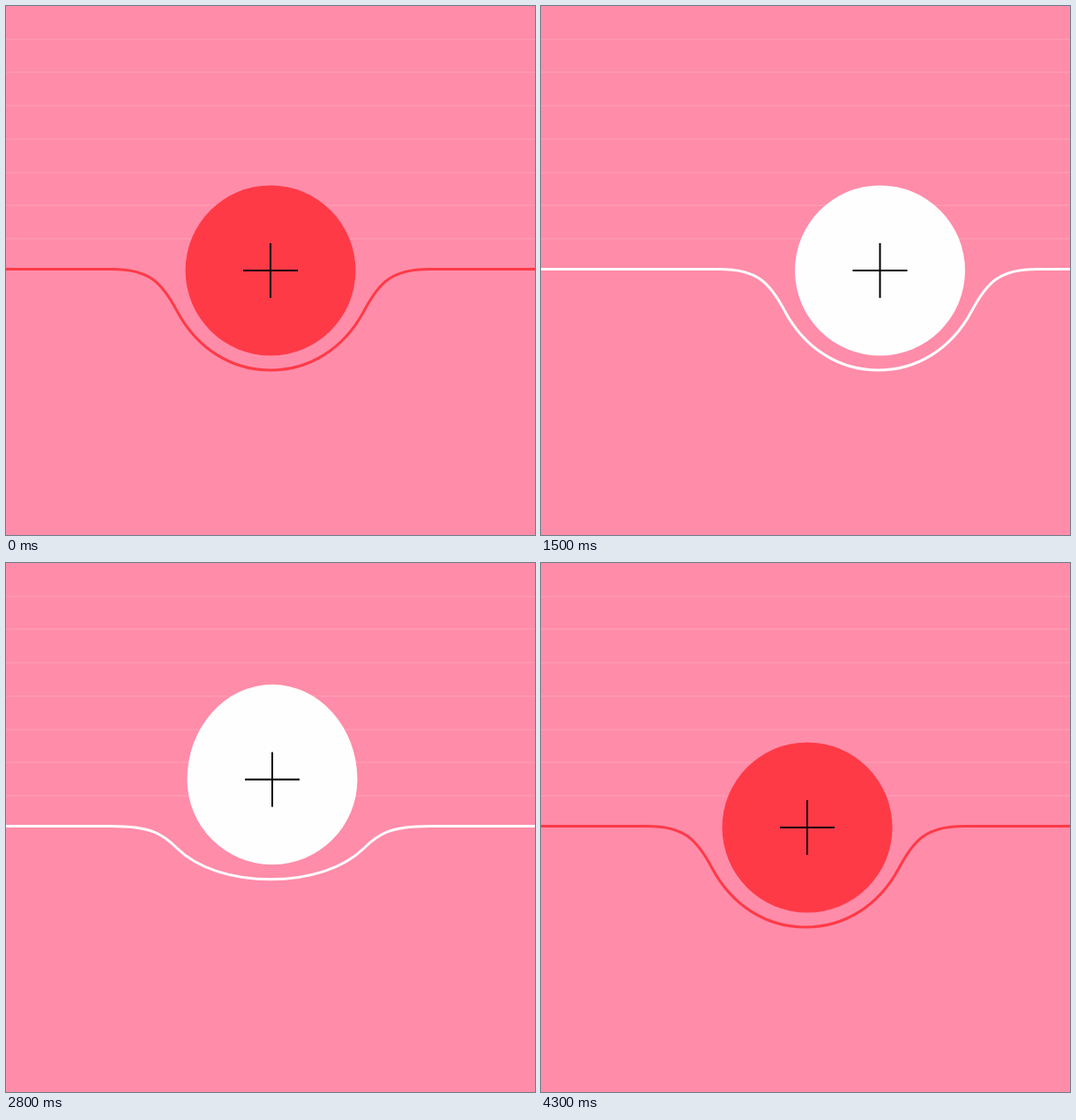
Recreate the animation shown at these times as an HTML page with a canvas. Size 600x600 px, loop 4400 ms.

```html
<!DOCTYPE html>
<html lang="en">
<head>
<meta charset="utf-8">
<title>Bouncing button</title>
<style>
  html, body { margin: 0; width: 100%; height: 100%; overflow: hidden; background: #ff8ca9; }
  canvas { display: block; width: 600px; height: 600px; }
</style>
</head>
<body>
<canvas id="stage" width="600" height="600"></canvas>
<script>
const ctx = document.getElementById('stage').getContext('2d');
const RED = '#ff3a47', WHITE = '#fffeff';
const LOOP = 4400, STEP = 100;   // the motion advances ten times a second
const SPAN = 932;                // width of one panel
const LINE = 298.5, R = 96.5;
const FLIGHT = 540, SETTLE = 110;

const clamp = v => Math.min(1, Math.max(0, v));

// cubic-bezier(.53, 0, .1, 1), solved by bisection
function ease(x) {
  if (x <= 0 || x >= 1) return clamp(x);
  let lo = 0, hi = 1;
  for (let i = 0; i < 24; i++) {
    const s = (lo + hi) / 2, q = 1 - s;
    if (3 * q * q * s * .53 + 3 * q * s * s * .1 + s * s * s < x) lo = s; else hi = s;
  }
  return lo * lo * (3 - 2 * lo);
}

const slide = (t, start) => SPAN * ease((t - start) / 800);

// Height above rest and stretch of the upper half, ms after take-off
function jump(ms) {
  const u = clamp(ms / FLIGHT), arc = 4 * u * (1 - u);
  const dip = 18 * Math.sin(Math.PI * clamp((ms - FLIGHT) / SETTLE));
  return { height: 162 * arc - dip, stretch: 41 * arc * Math.abs(1 - 2 * u) };
}

function drawGroove(depth) {
  const y = v => LINE + (v - LINE) * depth;
  ctx.beginPath();
  ctx.moveTo(-166, LINE);
  ctx.lineTo(120, LINE);
  ctx.bezierCurveTo(163, LINE, 177, y(314), 194, y(346));
  ctx.bezierCurveTo(217, y(389), 256, y(413), 300, y(413));
  ctx.bezierCurveTo(344, y(413), 383, y(389), 406, y(346));
  ctx.bezierCurveTo(423, y(314), 437, LINE, 480, LINE);
  ctx.lineTo(766, LINE);
  ctx.lineWidth = 3;
  ctx.stroke();
}

function drawBall(x, y, stretch) {
  ctx.beginPath();
  ctx.arc(x, y, R, 0, Math.PI);
  ctx.ellipse(x, y, R, R + stretch, 0, Math.PI, 2 * Math.PI);
  ctx.fill();
  ctx.fillStyle = '#000';
  ctx.fillRect(x - 31, y - 1, 62, 2);
  ctx.fillRect(x - 1, y - 31, 2, 62);
}

function drawPanel(color, shift, ballX, { height, stretch }) {
  ctx.save();
  ctx.translate(shift, 0);
  ctx.strokeStyle = ctx.fillStyle = color;
  drawGroove(Math.max(0, 1 - height / 115));
  drawBall(ballX, 300 - height, stretch);
  ctx.restore();
}

function draw(t) {
  ctx.fillStyle = '#ff8ca9';
  ctx.fillRect(0, 0, 600, 600);
  ctx.fillStyle = '#ff97b1';
  for (let i = 1; i < 8; i++) ctx.fillRect(0, Math.round(i * 37.7) - 1, 600, 2);

  const a = slide(t, 1000), b = slide(t, 3430);
  drawPanel(RED, -a, 300, jump(t - 250));
  drawPanel(WHITE, SPAN - a - b, 302, jump(t - 2310));
  drawPanel(RED, 2 * SPAN - a - b, 302, jump(0));
}

function tick() {
  const t = performance.now() % LOOP;
  draw(Math.floor(t / STEP) * STEP);
  requestAnimationFrame(tick);
}
tick();
</script>
</body>
</html>
```
